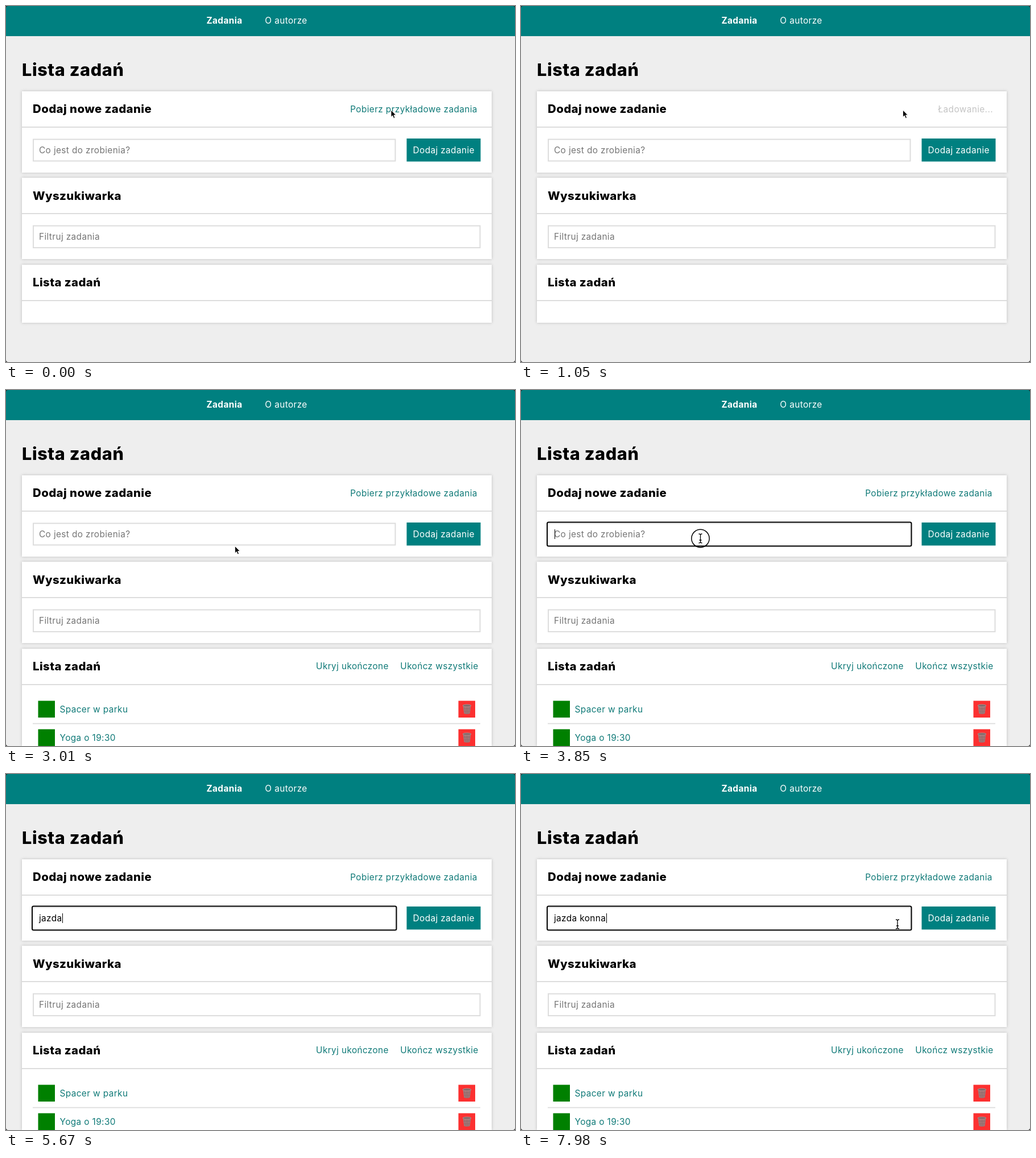
An HTML page for the animation above (8 s loop, 895 by 626 pixels).

```html
<!DOCTYPE html>
<html lang="pl">
<head>
<meta charset="utf-8">
<title>Lista zadań</title>
<style>
  html, body { margin: 0; width: 100%; height: 100%; overflow: hidden; background: #eee; }
  #stage { position: relative; width: 895px; height: 626px; overflow: hidden; contain: strict; }
  .card {
    position: absolute; left: 28px; width: 826px; height: 143px;
    background: #fff; box-shadow: 0 0 5px #bbb;
  }
  .card::after {
    content: ""; position: absolute; top: 62px; width: 100%; height: 2px; background: #ddd;
  }
  #add { top: 150px; }
  #search { top: 302px; }
  #list { top: 455px; height: 102px; }
  #list.full { height: 171px; }
  svg { position: absolute; left: 0; top: 0; display: block; }
  text {
    font: 400 15.4px Inter, "Open Sans", sans-serif;
    letter-spacing: .024em; white-space: pre;
  }
  .bold { font-weight: 700; }
  .h1, .h2 { font-weight: 800; letter-spacing: .02em; }
  .h1 { font-size: 30.6px; }
  .h2 { font-size: 20.4px; }
  .mid { text-anchor: middle; }
  .end { text-anchor: end; }
  .white { fill: #fff; }
  .hint { fill: #757575; }
  .link { fill: #107a78; }
  .field { fill: #fff; stroke: #ddd; stroke-width: 2; }
  .line { fill: none; stroke: #000; }
  .off { display: none; }
</style>
</head>
<body>
<div id="stage">
<div class="card" id="add"></div>
<div class="card" id="search"></div>
<div class="card" id="list"></div>

<svg width="895" height="626" viewBox="0 0 895 626">
  <defs>
    <g id="task">
      <rect x="56.5" y="546.5" width="29.5" height="29.5" fill="green"/>
      <rect x="795.5" y="546.5" width="29.5" height="29.5" fill="#fc3030"/>
      <path d="M803.5 555 L805.3 569 Q810.5 571 815.7 569 L817.5 555Z" fill="#a87878"/>
      <path d="M806 557 L808 569.5 M809.5 557 L810 570 M812 557 L811.5 570 M815.5 557 L813.5 569.5
               M804.5 560.5 H816.5 M805 565 H816" fill="none" stroke="#8a6a6a" stroke-width=".7"/>
      <ellipse cx="810.5" cy="555" rx="7.3" ry="2" fill="#806868" stroke="#b09090"/>
      <rect x="47" y="585.7" width="787" height="1.8" fill="#ddd"/>
    </g>
  </defs>

  <rect width="895" height="53" fill="teal"/>
  <text class="bold white mid" x="384" y="30.5">Zadania</text>
  <text class="white mid" x="492.5" y="30.5">O autorze</text>
  <text class="h1" x="28" y="123">Lista zadań</text>

  <text class="h2" x="47" y="188">Dodaj nowe zadanie</text>
  <text class="mid" id="fetch" x="717" y="186.5">Pobierz przykładowe zadania</text>
  <text class="end" id="loading" x="830" y="186.5" fill="#c4c4c4">Ładowanie...</text>
  <rect class="field" x="48" y="234.5" width="636.5" height="38"/>
  <g id="focus">
    <rect x="47.5" y="234" width="637.5" height="39" fill="none" stroke="#fff"/>
    <rect class="line" x="46" y="232.5" width="640.5" height="42" rx="2.5" stroke-width="2"/>
  </g>
  <text class="hint" id="hint" x="58" y="259">Co jest do zrobienia?</text>
  <text id="typed" x="58" y="259"></text>
  <rect id="caret" y="245" width="1" height="17"/>
  <rect x="704.5" y="233" width="130" height="40.5" fill="teal"/>
  <text class="white mid" x="769.7" y="259">Dodaj zadanie</text>

  <text class="h2" x="47" y="340.5">Wyszukiwarka</text>
  <rect class="field" x="48" y="386.5" width="785.5" height="38.5"/>
  <text class="hint" x="58" y="411">Filtruj zadania</text>

  <text class="h2" x="47" y="493">Lista zadań</text>
  <g id="tasks">
    <text class="link mid" x="609" y="491">Ukryj ukończone</text>
    <text class="link mid" x="762" y="491">Ukończ wszystkie</text>
    <use href="#task"/>
    <text class="link" x="94.5" y="567">Spacer w parku</text>
    <use href="#task" y="50"/>
    <text class="link" x="94.5" y="616.5">Yoga o 19:30</text>
  </g>

  <g id="pointer">
    <circle class="line" id="ring" r="15.7" stroke-width="1.5"/>
    <path id="arrow" d="M0 0 V12.3 L2.8 9.7 L4.8 14.4 L7 13.5 L5 8.9 H8.8Z" stroke="#fff" stroke-width=".9"/>
    <path class="line" id="beam" stroke-width="1.3"
          d="M-3 -8 Q0 -8 0 -6 Q0 -8 3 -8 M0 -6 V6 M-3 8 Q0 8 0 6 Q0 8 3 8 M-2 3 H2"/>
  </g>

  <!-- rounded window corners -->
  <path fill="#222" fill-rule="evenodd"
        d="M0 0 H895 V626 H0Z M4 0 H891 Q895 0 895 4 V622 Q895 626 891 626 H4 Q0 626 0 622 V4 Q0 0 4 0Z"/>
</svg>
</div>

<script>
  const LOOP = 8000, TICK = 70;
  const PHRASE = "jazda konna";
  const KEYS = [4760, 4970, 5180, 5390, 5670, 5880, 6160, 6370, 6650, 6790, 6930];
  const LINK = [16, 122, 120], HOVER = [34, 150, 147], ACTIVE = [40, 170, 167];
  const REST = [671.5, 183], FIELD = [315.5, 261], EXIT = [662, 264];

  const el = id => document.getElementById(id);
  const show = (id, on) => el(id).classList.toggle("off", !on);
  const within = (t, a, b) => t >= a && t < b;
  const progress = (t, a, b) => Math.min(1, Math.max(0, (t - a) / (b - a)));
  const ease = p => p * p * (3 - 2 * p);
  const mix = (a, b, p) => a.map((v, i) => v + (b[i] - v) * p);
  const arc = (a, b, c, p) => mix(mix(a, b, p), mix(b, c, p), p);

  function pointerAt(t) {
    if (t < 2660) return mix([677, 183], REST, progress(t, 70, 280));
    if (t < 7560) return arc(REST, [480, 310], FIELD, ease(progress(t, 2590, 3220)));
    return arc(FIELD, [490, 297], EXIT, ease(progress(t, 7490, 7980)));
  }

  function linkColor(t) {
    if (within(t, 910, 1050)) return ACTIVE;
    const hover = t < 2170 ? progress(t, 70, 280) : 1 - progress(t, 2590, 2800);
    return mix(LINK, HOVER, hover);
  }

  function render(t) {
    const loading = within(t, 1050, 2170), loaded = t >= 2170, focused = t >= 3850;

    show("fetch", !loading);
    show("loading", loading);
    el("fetch").style.fill = `rgb(${linkColor(t)})`;
    show("tasks", loaded);
    el("list").classList.toggle("full", loaded);

    const text = PHRASE.slice(0, KEYS.filter(k => k <= t).length);
    if (el("typed").textContent !== text) el("typed").textContent = text;
    const width = text ? el("typed").getComputedTextLength() : 0;
    el("caret").setAttribute("x", Math.round(58.5 + width));
    show("caret", focused && !within(t, 4410, 4760) && !within(t, 7420, 7980));
    show("focus", focused);
    show("hint", !text);

    const [x, y] = pointerAt(t);
    const overField = x > 47 && x < 685 && y > 233 && y < 274;
    el("pointer").setAttribute("transform", `translate(${x} ${y})`);
    show("pointer", !within(t, 4760, 7560));
    show("arrow", !overField);
    show("beam", overField);
    show("ring", within(t, 910, 1050) || within(t, 3850, 3920));
  }

  function frame(now) {
    const t = now % LOOP;
    render(t - t % TICK);
    requestAnimationFrame(frame);
  }
  render(0);
  requestAnimationFrame(frame);
</script>
</body>
</html>
```
